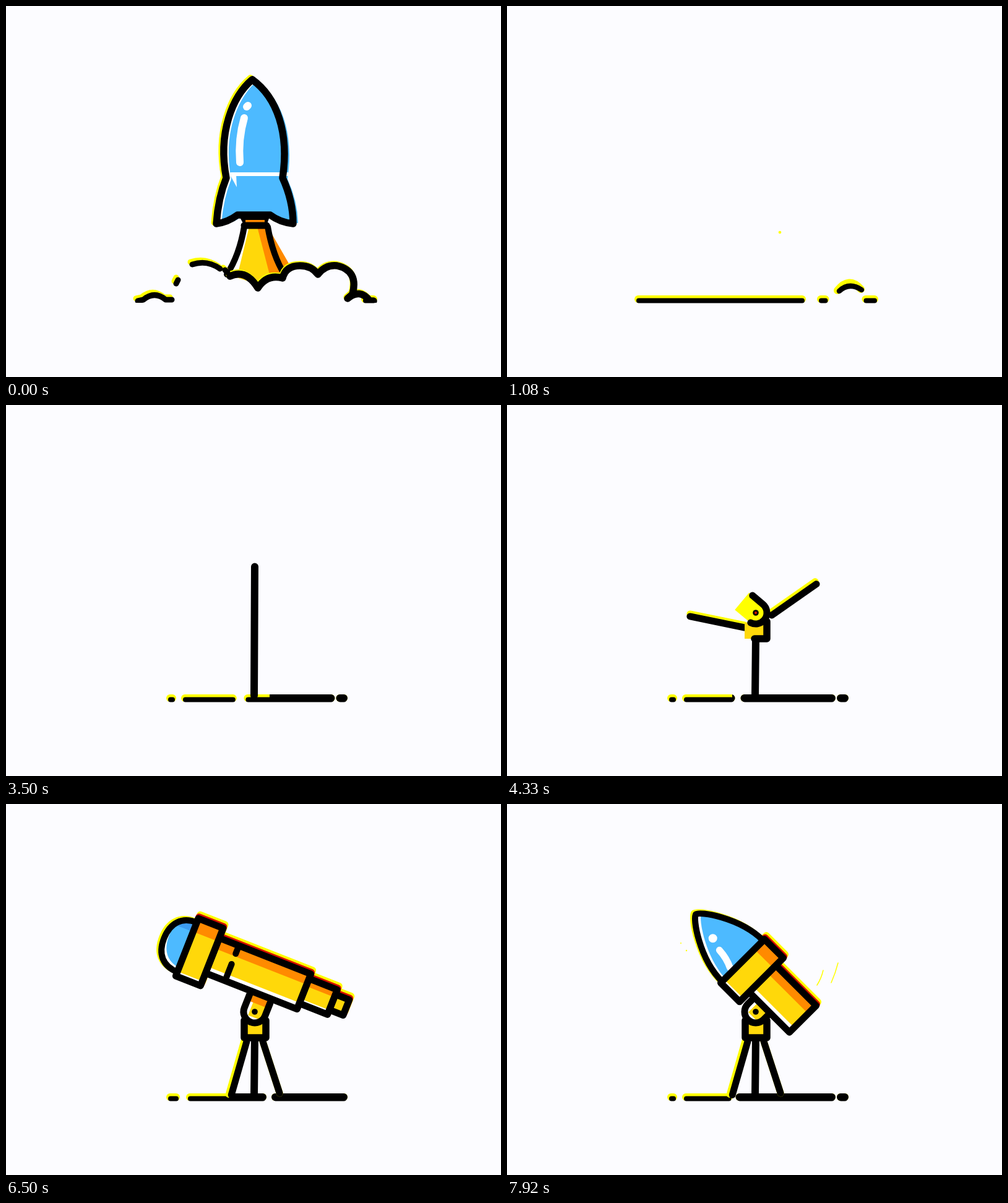
An HTML page with a canvas for the animation above (8 s loop, 800 by 600 pixels).

```html
<!DOCTYPE html>
<html lang="en">
<head>
<meta charset="utf-8">
<title>Rocket and telescope</title>
<style>
  html, body { margin: 0; width: 100%; height: 100%; overflow: hidden; background: #fcfcff; }
  canvas { display: block; width: 800px; height: 600px; }
</style>
</head>
<body>
<canvas id="stage" width="800" height="600"></canvas>
<script>
const LOOP = 8000, FPS = 12, GROUND = 474;
const INK = '#000', GLOW = '#ffff00', YELLOW = '#ffd80a', ORANGE = '#ff8a00', RED = '#d81000',
      BLUE = '#4dbaff', DEEP = '#3c9cf0', WHITE = '#fff', PAPER = '#fcfcff';
const ctx = document.getElementById('stage').getContext('2d');
ctx.lineCap = ctx.lineJoin = 'round';

// Eased value from flat time, value, time, value... pairs.
function key(t, ...k) {
  if (t <= k[0]) return k[1];
  for (let i = 2; i < k.length; i += 2) {
    if (t < k[i]) {
      const u = (t - k[i - 2]) / (k[i] - k[i - 2]);
      return k[i - 1] + (k[i + 1] - k[i - 1]) * u * u * (3 - 2 * u);
    }
  }
  return k[k.length - 1];
}
const shape = d => new Path2D(d);
const line = (x0, y0, x1, y1) => shape(`M${x0} ${y0}L${x1} ${y1}`);
const box = (x0, y0, x1, y1) => shape(`M${x0} ${y0}H${x1}V${y1}H${x0}Z`);

function stroke(path, width = 11, color = INK) {
  ctx.lineWidth = width;
  ctx.strokeStyle = color;
  ctx.stroke(path);
}
function fill(path, color) {
  ctx.fillStyle = color;
  ctx.fill(path);
}
function dot(x, y, r, color = INK) {
  ctx.beginPath();
  ctx.arc(x, y, r, 0, Math.PI * 2);
  ctx.fillStyle = color;
  ctx.fill();
}
function layer(draw) {
  ctx.save();
  draw();
  ctx.restore();
}
function shifted(x, y, draw) {
  layer(() => { ctx.translate(x, y); draw(); });
}
function inside(path, draw) {
  layer(() => { ctx.clip(path); draw(); });
}
function drawn(path, length, width) {
  if (length <= 0) return;
  layer(() => { ctx.setLineDash([length, 999]); stroke(path, width); });
}
function plus(x, y, r) {
  stroke(shape(`M${x - r} ${y}h${2 * r}M${x} ${y - r}v${2 * r}`), r * .6, GLOW);
}

function ground(t) {
  const gaps = [
    [key(t, 4330, 279, 5330, 273), key(t, 1083, 0, 1600, 8, 4330, 8, 5330, 0)],
    [key(t, 0, 390, 1083, 492, 2500, 386, 4330, 373, 5330, 311, 6500, 286, 7920, 279),
     key(t, 0, 368, 1083, 18, 2500, 15, 4330, 9, 5330, 12, 6500, 10, 7920, 8)],
    [key(t, 0, 547, 1083, 547, 1600, 534, 4330, 532, 5330, 520, 6500, 425, 7920, 367),
     key(t, 1083, 53, 1600, 2, 4330, 2, 5330, 10, 6500, 8, 7920, 5)],
    [key(t, 6500, 545, 7920, 532), key(t, 6500, 0, 7300, 2)]
  ].filter(g => g[1] > .5);
  let x = key(t, 1200, 206, 1640, 259);
  const end = key(t, 1200, 600, 1640, 552), dashes = [];
  for (const [c, w] of gaps) {
    dashes.push([x, c - w / 2]);
    x = Math.max(x, c + w / 2);
  }
  dashes.push([x, end]);
  for (const [a, b] of dashes) {
    if (b - a < 8) continue;
    const mid = (a + b) / 2, from = Math.min(a + 6, mid), to = Math.max(b - 6, mid);
    const full = line(from, GROUND, to, GROUND);
    stroke(full, 12, GLOW);
    stroke(line(Math.min(from + 1, to), 476.5, to, 476.5), 8);
    if (t > 2700) inside(box(key(t, 2700, 552, 4000, 364), 460, 560, 490), () => stroke(full, 12));
  }
}

const cloudFront = shape('M362 437Q388 425 407 456Q422 433 447 440Q452 420 475 420Q494 420 504 434Q516 418 535 420Q570 428 560 466L552 473Q572 456 588 477H594');
const cloudBack = shape('M301 418Q325 410 346 425M354 427L358 431M275 449L278 443M213 477L222 475Q240 460 258 475H268');

function clouds(t) {
  const s = key(t, 100, 1, 800, 0);
  const squash = p => {
    const out = new Path2D();
    out.addPath(p, new DOMMatrix([1, 0, 0, s, 0, GROUND * (1 - s)]));
    return out;
  };
  inside(box(0, 0, 800, 480), () => {
    if (s > .04) {
      const back = squash(cloudBack), front = squash(cloudFront);
      shifted(-3, -4, () => stroke(back, 9, GLOW));
      shifted(-1, -2, () => stroke(front, 11, GLOW));
      stroke(back, 9);
      stroke(front, 11.5);
    }
    if (t > 750 && t < 1550) {
      const h = key(t, 750, 0, 1000, 1, 1083, 1, 1540, 0), y = GROUND - 14 * h;
      stroke(shape(`M534 ${y}Q553 ${y - 24 * h} 572 ${y - 2}`), 12, GLOW);
      stroke(shape(`M537 ${y + 1}Q553 ${y - 14 * h} 573 ${y - 1}`), 8.5);
    }
  });
}

const rocketBody = shape('M398 119C366 146 342 205 356 278Q343 310 340 352Q358 350 374 338H427Q443 350 464 352Q464 315 447 278C458 205 438 148 398 119Z');

function rocket(t) {
  const lift = key(t, 0, 0, 170, 10, 800, -570);
  if (t > 840) return;
  const k = key(t, 80, 0, 600, 1), spread = 1 - k;
  const top = 357 + lift, foot = 434 + k * (lift + 110);
  const left = 402 - 45 * spread, right = 402 + 48 * spread;
  const waist = (top + foot) / 2 + 8;
  const flame = shape(`M385 ${top}Q377 ${waist} ${left} ${foot}L407 ${foot + 16}L${right} ${foot}Q431 ${waist} 423 ${top}Z`);
  fill(flame, WHITE);
  inside(flame, () => {
    fill(shape(`M393 ${top}L${left + 16 * spread} ${foot + 6}L407 ${foot + 20}H${right}L423 ${top}Z`), YELLOW);
  });
  fill(shape(`M406 ${top}L${402 + 26 * spread} ${foot + 8}L${402 + 46 * spread} ${foot}L${402 + 56 * spread} ${foot - 16 * spread}L423 ${top}Z`), ORANGE);
  stroke(shape(`M385 ${top}Q377 ${waist} ${left} ${foot}M423 ${top}Q431 ${waist} ${right} ${foot}`), 10);

  shifted(0, lift, () => {
    shifted(-3, -2, () => stroke(rocketBody, 11, GLOW));
    fill(rocketBody, WHITE);
    inside(box(300, 100, 500, 351), () => shifted(8, 2, () => fill(rocketBody, BLUE)));
    stroke(line(364, 272, 455, 272), 6, WHITE);
    fill(shape('M362 273H372L373 293Z'), WHITE);
    stroke(line(389, 163, 391, 161), 12, WHITE);
    stroke(shape('M385 181Q375 215 378 253'), 12, WHITE);
    stroke(rocketBody, 11.5);
    fill(shape('M376 338H427L421 355H385Z'), INK);
    fill(box(387, 346, 418, 350), ORANGE);
    stroke(line(385, 355, 421, 355));
  });
}

// A drop leaps from the ground, trailing a tapered tail.
function drop(t) {
  const START = 2330, LIFE = 1000;
  if (t < START || t > START + LIFE) return;
  const at = time => {
    const u = (time - START) / LIFE;
    return [406 + 296 * u * (1 - u), 184 + 286 * (2 * u - 1) ** 2];
  };
  const [x0, y0] = at(Math.max(START, t - 170)), [x1, y1] = at(t);
  const cx = (x0 + x1) / 2 + 9, cy = (y0 + y1) / 2;
  const taper = (from, r, dx, dy, color) => {
    for (let v = from; v <= 1; v += .01) {
      const w = 1 - v;
      dot(w * w * x0 + 2 * v * w * cx + v * v * x1 + dx,
          w * w * y0 + 2 * v * w * cy + v * v * y1 + dy,
          r * (v - from) / (1 - from), color);
    }
  };
  taper(0, 6.5, 0, 0, GLOW);
  taper(.4, 4.5, 2, 5, INK);
}

function leg(x, y, angle, length, glowX, glowY) {
  const a = angle * Math.PI / 180;
  const path = line(x, y, x + length * Math.cos(a), y + length * Math.sin(a));
  shifted(glowX, glowY, () => stroke(path, 11, GLOW));
  stroke(path);
}

function tripod(t) {
  if (t < 3330) return;
  const top = key(t, 3330, 470, 3580, 195, 3830, 410, 4080, 366, 4250, 378);
  if (t > 4000) {
    const grow = key(t, 4000, 0, 4300, 1);
    const open = (from, to) => key(t, 4330, from, 4750, to);
    leg(open(384, 389), open(360, 384), open(191.6, 106), 90 * grow, open(0, -4), open(-4, -1));
    leg(open(428, 415), open(340, 384), open(-35, 72), 88 * grow, open(-2, 0), open(-4, 0));
  }
  stroke(line(402, top, 401, 470), 12);
  if (t > 4050) {
    fill(box(384, 352, 420, 378), YELLOW);
    drawn(shape('M420 350V378H385V350'), key(t, 4050, 0, 4330, 48, 4600, 100), 11.5);
  }
}

function panel(path, x0, y0, x1, y1, top, bottom) {
  const h = y1 - y0;
  fill(path, WHITE);
  fill(box(x0, y0, x1, y0 + h * bottom), YELLOW);
  fill(box(x0, y0, x1, y0 + h * top), ORANGE);
  stroke(path);
}

function telescope(t) {
  if (t < 4080) return;
  const angle = key(t, 4080, -80, 4330, -50, 4830, 34, 5080, 26, 5330, 27.5, 5900, 19, 6500, 21.5,
    6800, 20, 7170, 33, 7500, 49, 7750, 44, 7920, 45) * Math.PI / 180;
  const turn = draw => layer(() => { ctx.rotate(angle); draw(); });
  shifted(402, 336, () => {
    turn(() => {
      const tab = shape('M18 -29V0A18 18 0 0 1 -18 0V-29Z');
      fill(tab, t < 4400 ? GLOW : WHITE);
      inside(tab, () => {
        if (t < 4400) return;
        fill(box(-8, -29, 18, 9), YELLOW);
        fill(box(-18, -29, 18, -13), ORANGE);
      });
      drawn(shape('M18 -22V0A18 18 0 0 1 -18 0V-29'), key(t, 4080, 0, 4330, 74, 4600, 120), 11);
    });
    if (t > 4400) tube(t, turn);
    dot(0, 0, 4.8);
    if (t < 4400) dot(0, 0, 2, RED);
  });
}

function tube(t, turn) {
  const size = key(t, 4400, .05, 4800, 1.06, 5000, 1);
  const morph = key(t, 6800, 0, 7500, 1);
  const slide = 67 * morph, tip = key(t, 6750, -180, 7170, -345, 7420, -168, 7580, -188, 7750, -180);
  const out2 = 62 + 49 * key(t, 4800, 0, 5100, 1, 6800, 1, 7350, 0);
  const out3 = out2 + 24 * key(t, 5080, 0, 5330, 1, 6750, 1, 7000, 0);
  const base = slide - 140, cy = -57, w = 43 + 4 * morph, bend = .65 - .5 * morph;
  const c1 = base + (tip - base) * (.62 - .12 * morph);
  const nose = shape(`M${base} ${cy - w}C${c1} ${cy - w} ${tip} ${cy - w * bend} ${tip} ${cy}` +
    `C${tip} ${cy + w * bend} ${c1} ${cy + w} ${base} ${cy + w}Z`);
  const parts = [
    [out2, -74, out3, -47, .1, 1],
    [62, -82, out2, -39, .3, .82],
    [slide - 97, -90, 62, -29, .3, .82],
    [base, -107, slide - 97, -7, .23, .92]
  ].filter(p => p[2] - p[0] > 1).map(p => [box(...p.slice(0, 4)), ...p]);
  const place = draw => turn(() => {
    ctx.scale(size, size);
    ctx.translate(0, 14 * morph);
    draw();
  });
  const echo = (x, y, color) =>
    shifted(x, y, () => place(() => parts.forEach(p => stroke(p[0], 11, color))));

  shifted(-3, -2, () => place(() => stroke(nose, 10, GLOW)));
  echo(3, -6, GLOW);
  echo(1, -2.5, RED);
  place(() => {
    fill(nose, WHITE);
    inside(nose, () => {
      shifted(6, -7, () => fill(nose, BLUE));
      if (morph < .5) fill(box(tip, cy - w, base, cy - w * .62), DEEP);
    });
    if (morph > .9) {
      dot(-133, -49, 7, WHITE);
      stroke(shape('M-112 -43Q-94 -42 -80 -35'), 11, WHITE);
    }
    stroke(nose, 10);
    parts.forEach(p => panel(...p));
    if (morph < .5) {
      stroke(line(-63, -88, -63, -76), 10);
      stroke(line(-63, -58, -63, -31), 10);
    }
  });
}

function sparks(t) {
  if (t > 950 && t < 1300) dot(441, 366 + (t - 1083) * .06, 2.3, GLOW);
  if (t > 2330 && t < 2800) {
    const s = key(t, 2330, .4, 2500, 1, 2800, 0), rise = (t - 2500) * .03;
    plus(437, 451 - rise, 4.5 * s);
    plus(395, 441 - rise, 2.5 * s);
    dot(423, 445 - rise, s, GLOW);
  }
  if (t > 7650) {
    stroke(shape('M511 269Q508 282 501 293M535 257Q531 273 524 289'), 1.5, GLOW);
    dot(281, 225, 1, GLOW);
    dot(290, 237, 1.2, GLOW);
  }
}

function render(now) {
  const frame = Math.floor((now % LOOP + 4) * FPS / 1000) % (LOOP * FPS / 1000);
  const t = frame * 1000 / FPS;
  ctx.fillStyle = PAPER;
  ctx.fillRect(0, 0, 800, 600);
  rocket(t);
  ground(t);
  clouds(t);
  drop(t);
  tripod(t);
  telescope(t);
  sparks(t);
}

const start = performance.now();
(function tick() {
  render(performance.now() - start);
  requestAnimationFrame(tick);
})();
</script>
</body>
</html>
```
